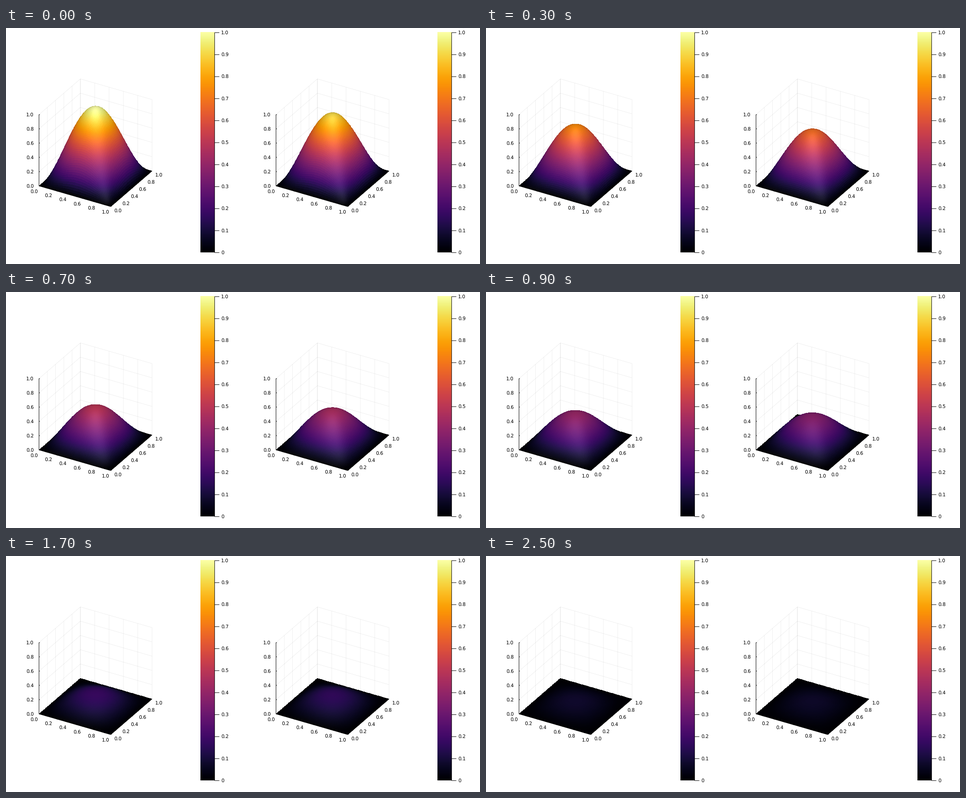
Animation of 1058 by 529 pixels, one loop 2600 ms. Source, as a matplotlib script:

```python
import numpy as np
import matplotlib.pyplot as plt
from matplotlib.animation import FuncAnimation

WIDTH, HEIGHT, DPI = 1058, 529, 100
PX = 72 / DPI                       # points per pixel
FRAMES, INTERVAL = 26, 100
DECAY = np.pi ** 2 / 100            # heat decay of the lowest mode per step
CELLS = 100
PANEL_SHIFT = 529

# Orthographic camera: screen position of the origin and of the unit axes
ORIGIN = np.array([73.7, 354.0])
AXIS_X = np.array([160.0, 46.3])
AXIS_Y = np.array([92.3, -79.9])
AXIS_Z = np.array([0.0, -160.0])
VIEW = np.array([0.433, -0.75, 0.5])
AMBIENT, DIFFUSE, SPECULAR, SHININESS = 0.8, 0.2, 0.1, 10
STEEPNESS = 1.4                     # relief exaggeration used for the lighting

plt.rcParams["font.family"] = "DejaVu Sans"
plt.rcParams["text.hinting"] = "none"
inferno = plt.get_cmap("inferno")
fig = plt.figure(figsize=(WIDTH / DPI, HEIGHT / DPI), dpi=DPI, facecolor="white")
ax = fig.add_axes([0, 0, 1, 1])
ax.axis("off")


def project(x, y, z):
    return [ORIGIN[i] + AXIS_X[i] * x + AXIS_Y[i] * y + AXIS_Z[i] * z for i in (0, 1)]


def line(p, q, shift=0, color="black", width=1.0, zorder=3):
    ax.plot([p[0] + shift, q[0] + shift], [p[1], q[1]], color=color, lw=width * PX,
            zorder=zorder, solid_capstyle="butt", snap=False)


def label(x, y, text, ha="center"):
    ax.text(x, y, text, fontsize=10.67 * PX, ha=ha, va="center", zorder=4)


def draw_box(shift):
    def grid(a, b):
        line(project(*a), project(*b), shift, (0, 0, 0, 0.1), 0.6, 0)

    for t in np.linspace(0, 1, 6):
        grid((0, t, 0), (0, t, 1))
        grid((0, 0, t), (0, 1, t))
        grid((t, 1, 0), (t, 1, 1))
        grid((0, 1, t), (1, 1, t))

        text = f"{t:.1f}"
        x, y = project(0, 0, t)
        line((x, y), (x + 2, y), shift)
        label(62 + shift, y + 0.5, text, "right")
        label(62.5 + 160 * t + shift, 366.8 + 46 * t, text)
        label(249.7 + 92 * t + shift, 410.3 - 80 * t, text)

    line(project(0, 0, 0), project(0, 0, 1), shift)
    line(project(0, 0, 0), project(1, 0, 0), shift)
    line(project(1, 0, 0), project(1, 1, 0), shift)


def draw_colorbar(shift):
    left, right, top, bottom = 433.7 + shift, 465.7 + shift, 10.4, 503.5
    ax.imshow(np.linspace(1, 0, 256)[:, None], cmap=inferno, aspect="auto",
              extent=(left, right, bottom, top), interpolation="nearest")
    line((right, top), (right, bottom))
    for k in range(11):
        y = bottom - (bottom - top) * k / 10
        line((right, y), (right + 10.5, y))
        label(480.3 + shift, y + 0.2, f"{k / 10:.1f}" if k else "0", "left")


def shade(x, y, amplitude):
    """Colour by height, lit by a lamp at the camera."""
    sx, sy = np.sin(np.pi * x), np.sin(np.pi * y)
    relief = STEEPNESS * amplitude * np.pi
    slope_x = relief * np.cos(np.pi * x) * sy
    slope_y = relief * sx * np.cos(np.pi * y)
    facing = -slope_x * VIEW[0] - slope_y * VIEW[1] + VIEW[2]
    facing = np.clip(facing / np.sqrt(1 + slope_x ** 2 + slope_y ** 2), 0, 1)[..., None]
    base = inferno(amplitude * sx * sy)[..., :3]
    lit = base * (AMBIENT + DIFFUSE * facing) + SPECULAR * facing ** SHININESS
    return np.clip(lit, 0, 1)


# Rows run from the far edge to the near one, so later cells cover earlier ones
edges = np.linspace(0, 1, CELLS + 1)
centers = (edges[1:] + edges[:-1]) / 2
EDGE_X, EDGE_Y = np.meshgrid(edges, edges[::-1])
MID_X, MID_Y = np.meshgrid(centers, centers[::-1])
BUMP = np.sin(np.pi * EDGE_X) * np.sin(np.pi * EDGE_Y)

for offset in (0, PANEL_SHIFT):
    draw_box(offset)
    draw_colorbar(offset)
ax.set_xlim(0, WIDTH)
ax.set_ylim(HEIGHT, 0)
ax.set_aspect("auto")
ax.autoscale(False)

surfaces = []


def update(frame):
    while surfaces:
        surfaces.pop().remove()
    # The right panel is one time step ahead of the left
    for panel in (0, 1):
        amplitude = np.exp(-DECAY * (frame + panel))
        px, py = project(EDGE_X, EDGE_Y, amplitude * BUMP)
        surfaces.append(ax.pcolormesh(px + panel * PANEL_SHIFT, py,
                                      shade(MID_X, MID_Y, amplitude),
                                      shading="flat", antialiased=False, zorder=2))
    return surfaces


anim = FuncAnimation(fig, update, frames=FRAMES, interval=INTERVAL,
                     init_func=lambda: update(0), repeat=True, repeat_delay=0, blit=False)
plt.show()
```
